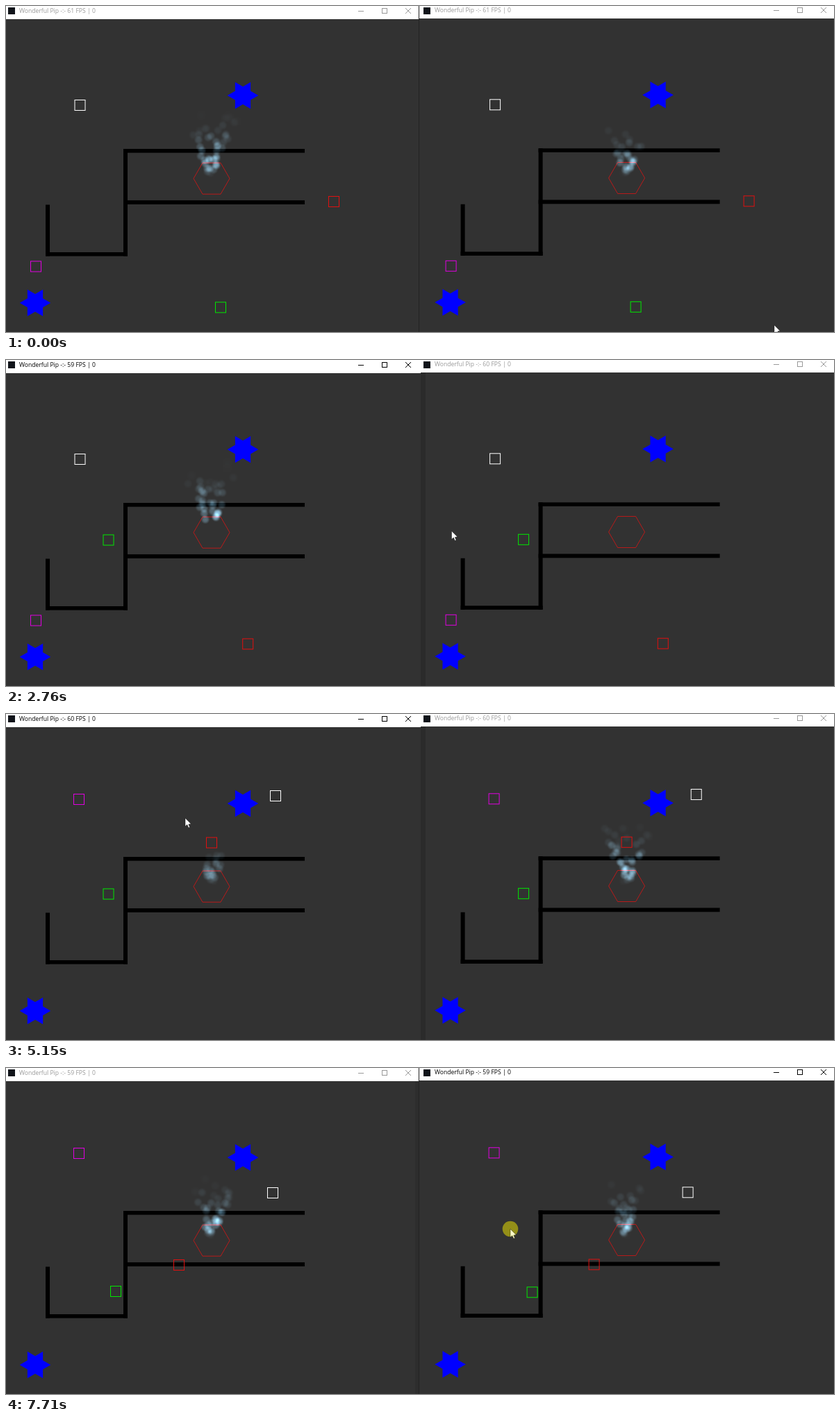
These frames come from a looping animation (1192x470 px, 7.79 s). An HTML page with a canvas:

```html
<!DOCTYPE html>
<html lang="en">
<head>
<meta charset="utf-8">
<title>Two game windows</title>
<style>
html, body { margin: 0; width: 100%; height: 100%; overflow: hidden; background: #323232; }
canvas { display: block; }
</style>
</head>
<body>
<canvas id="stage" width="1192" height="470"></canvas>
<script>
const ctx = document.getElementById('stage').getContext('2d');
const LOOP = 7790, STEP = 77.1;
const LIFE = 600, BURST = 600, BIRTH_GAP = 14;
const TITLE = 'Wonderful Pip';

// Turning points: [step, x, y]; motion between them is uniform.
const red = [[0, 472, 282], [11, 48, 321], [24, 385, 446], [33, 385, 449], [48, 201, 251],
  [57, 250, 361], [67, 296, 185.5], [79, 330, 456], [83, 304, 326], [88, 270, 180],
  [96, 280, 393], [100, 249, 284]];
const green = [[0, 309, 434.5], [9, 230, 215], [11, 215, 206], [21, 454, 294], [24, 346, 276],
  [29, 147.5, 259.5], [94, 147.5, 259.5], [97, 154, 318], [100, 160, 324]];
const white = [[36, 106.5, 143], [46, 451, 105], [48, 469, 103], [52, 510, 98],
  [67, 388, 118], [83, 392.5, 193], [95, 384, 180]];
const magenta = [[43, 43, 375.5], [48, 255, 205], [57, 105, 123]];
const pointer = [[0, 1106, 460], [11, 776, 75], [24, 763, 255], [48, 520, 238],
  [67, 258, 150], [83, 370, 232], [100, 726, 232]];

// The passive client trails one step behind.
const left = { x: 0, y: 0, greenLag: 1, whiteLag: 0,
  fps: [61, 60, 60, 59, 59, 60, 60, 60, 59],
  bursts: [-600, 770, 2100, 3250, 4900, 6340, 7180] };
const right = { x: 597.6, y: -.7, greenLag: 0, whiteLag: 1,
  fps: [61, 59, 60, 60, 61, 60, 60, 60, 59],
  bursts: [-380, 400, 1180, 3630, 4600, 5720, 7260] };

function at(track, n) {
  const next = track.findIndex(k => n <= k[0]);
  if (next <= 0) return track[next ? track.length - 1 : 0].slice(1);
  const [a, ax, ay] = track[next - 1], [b, bx, by] = track[next];
  const k = (n - a) / (b - a);
  return [ax + (bx - ax) * k, ay + (by - ay) * k];
}

function rand(i) {
  const v = Math.sin(i * 127.1 + 311.7) * 43758.5453;
  return v - Math.floor(v);
}

function box(x, y, w, h, color) {
  ctx.fillStyle = color;
  ctx.fillRect(x, y, w, h);
}

function line(x1, y1, x2, y2) {
  ctx.beginPath();
  ctx.moveTo(x1, y1);
  ctx.lineTo(x2, y2);
  ctx.stroke();
}

function polygon(cx, cy, count, radius) {
  ctx.beginPath();
  for (let i = 0; i < count; i++) {
    const a = i * 2 * Math.PI / count, r = radius(i);
    ctx.lineTo(cx + r * Math.cos(a), cy + r * Math.sin(a));
  }
  ctx.closePath();
}

function star(x, y) {
  polygon(x, y, 12, i => i % 2 ? 12.8 : 22.3);
  ctx.fillStyle = '#0000ff';
  ctx.fill();
}

function square([x, y], color) {
  ctx.strokeStyle = color;
  ctx.lineWidth = 1;
  ctx.strokeRect(x - 7.5, y - 7.5, 15, 15);
}

const puff = document.createElement('canvas');
puff.width = puff.height = 14;
{
  const p = puff.getContext('2d'), g = p.createRadialGradient(7, 7, 0, 7, 7, 6.5);
  g.addColorStop(0, 'rgba(105,160,190,.5)');
  g.addColorStop(.5, 'rgba(105,160,190,.42)');
  g.addColorStop(1, 'rgba(105,160,190,0)');
  p.fillStyle = g;
  p.fillRect(0, 0, 14, 14);
}

function fountain(bursts, t, seed) {
  ctx.save();
  ctx.globalCompositeOperation = 'lighter';
  for (const start of bursts) {
    for (let age = 0; age < BURST; age += BIRTH_GAP) {
      const p = (t - start - age) / LIFE;
      if (p < 0 || p >= 1) continue;
      const id = start + age + seed;
      const rise = 90 * p * (.75 + .35 * rand(id));
      const side = (rand(id + .37) - .5) * (9 + 70 * p);
      const warmUp = Math.min(1, .3 + age / 500);
      ctx.globalAlpha = warmUp * Math.min(1, p / .12) * (1 - p) * .9;
      ctx.drawImage(puff, 296 + side - 7, 242 - rise - 7);
    }
  }
  ctx.restore();
}

function titleBar(from, to, height, w, n, active) {
  const x = Math.round(w.x), y = Math.round(w.y);
  const ink = active ? '#000' : '#999';
  const fps = w.fps[Math.floor((n + 6) / 13)];
  box(from, 0, to - from, height, '#fff');
  box(x + 3, 2, 10, 10, '#10141a');
  ctx.fillStyle = ctx.strokeStyle = ink;
  ctx.font = '8.6px "Open Sans", "Noto Sans", sans-serif';
  ctx.fillText(`${TITLE} -:- ${fps} FPS | 0`, x + 19, y + 10.4);
  ctx.lineWidth = 1;
  line(x + 507, y + 7.5, x + 515, y + 7.5);
  ctx.strokeRect(x + 541.5, y + 3.5, 7, 7);
  line(x + 575, y + 3, x + 583, y + 11);
  line(x + 583, y + 3, x + 575, y + 11);
}

function scene(w, n) {
  ctx.save();
  ctx.translate(w.x, w.y);
  box(169, 206, 261, 5.6, '#000');
  box(169, 280.2, 261, 5.8, '#000');
  box(169, 206, 6, 154.5, '#000');
  box(57, 355, 118, 5.6, '#000');
  box(57, 286.5, 6, 74, '#000');
  star(341, 129);
  star(42, 428);
  polygon(296, 248.7, 6, () => 26);
  ctx.strokeStyle = '#c81818';
  ctx.lineWidth = .9;
  ctx.stroke();
  fountain(w.bursts, n * STEP, w.x);
  square(at(white, n - w.whiteLag), '#fff');
  square(at(magenta, n), '#e000e0');
  square(at(green, n - w.greenLag), '#00e800');
  square(at(red, n), '#e01010');
  ctx.restore();
}

function cursor([x, y], pressed) {
  if (pressed) {
    ctx.fillStyle = '#948f18';
    ctx.beginPath();
    ctx.arc(x, y, 11.3, 0, 7);
    ctx.fill();
  }
  ctx.beginPath();
  for (const [dx, dy] of [[0, 0], [0, 12], [2.8, 9.6], [4.8, 14], [6.6, 13.2], [4.8, 9], [8.4, 8.6]]) {
    ctx.lineTo(x + dx, y + dy);
  }
  ctx.closePath();
  ctx.fillStyle = pressed ? '#ffffc8' : '#fff';
  ctx.fill();
  ctx.strokeStyle = 'rgba(0,0,0,.7)';
  ctx.lineWidth = .6;
  ctx.stroke();
}

function draw(now) {
  const n = Math.floor((now % LOOP + 18.5) / STEP);
  const leftActive = n >= 31 && n < 85;
  const rightActive = n >= 5 && !leftActive;
  const pressed = n === 82 || n === 83 || n >= 99;

  box(0, 0, 1192, 470, '#323232');
  scene(left, n);
  scene(right, n);
  if (leftActive) box(597, 17, 7, 453, '#2b2b2b');
  else {
    if (rightActive) box(589, 18, 5, 452, '#2d2d2d');
    box(594, 0, 1, 470, '#222');
  }
  titleBar(0, leftActive ? 597 : 594, 19, left, n, leftActive);
  titleBar(leftActive ? 597 : 595, 1192, 18, right, n, rightActive);
  cursor(at(pointer, n), pressed);
  requestAnimationFrame(draw);
}
requestAnimationFrame(draw);
</script>
</body>
</html>
```
